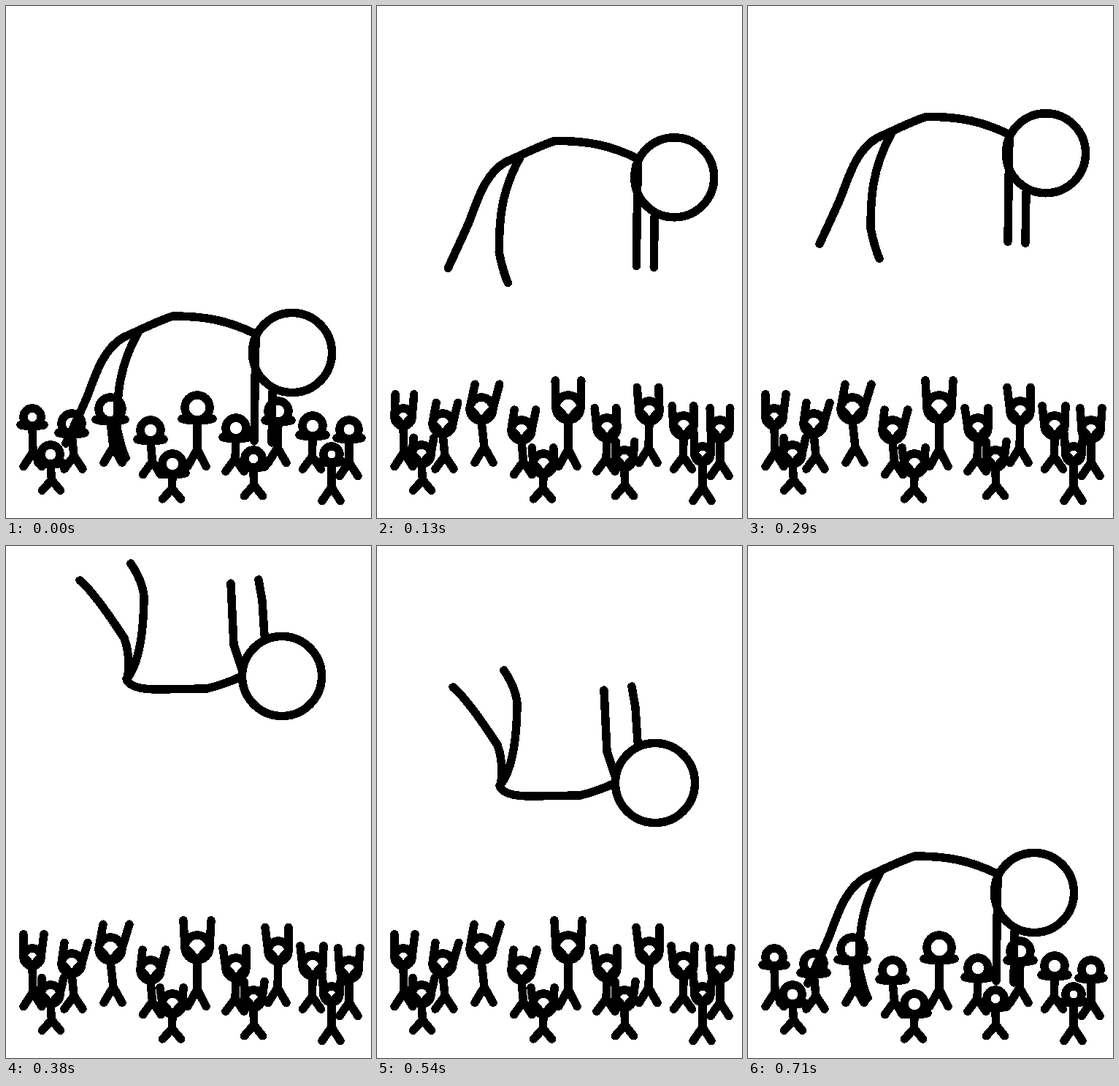
These frames come from a looping animation (500 by 700 pixels, 750 ms). An HTML page:

```html
<!DOCTYPE html>
<html lang="en">
<head>
<meta charset="utf-8">
<title>Crowd toss</title>
<style>
  html, body { margin: 0; width: 100%; height: 100%; overflow: hidden; background: #fff; }
  svg { display: block; width: 500px; height: 700px; }
  path, circle { fill: none; stroke: #000; stroke-width: 11.5; stroke-linecap: round; stroke-linejoin: round; }
  circle { fill: #fff; }
</style>
</head>
<body>
<svg viewBox="0 0 500 700" shape-rendering="crispEdges">
  <g id="crowd"></g>
  <g id="crawl">
    <path d="M355 243C320 226 290 219 243 219C225 224 200 237 175 248C145 265 135 305 124 332Q113 357 96 393"/>
    <path d="M194 243C168 290 166 330 166 372Q172 400 178 413"/>
    <path d="M379 322L378 392"/>
    <circle cx="406" cy="269" r="54.5"/>
    <path d="M356 245L354 390"/>
  </g>
  <g id="back">
    <path d="M101 47Q120 62 162 126Q171 150 166 184Q172 196 208 196L275 195Q300 189 323 178"/>
    <path d="M171 24Q188 50 189 70Q188 155 165 182"/>
    <path d="M308 51L312 135L323 168"/>
    <path d="M346 46L351 75L354 122"/>
    <circle cx="378" cy="178" r="54.5"/>
  </g>
</svg>
<script>
const LOOP = 750, STEPS = 18;

// head x, y, radius; head-to-hip length; lean
const people = [
  [36, 562, 12, 48, 2], [90, 571, 14, 44, 6], [143, 551, 16, 52, 8],
  [198, 580, 14, 43, 5], [262, 549, 17, 57, 0], [315, 577, 14, 42, -2],
  [373, 554, 14, 50, -2], [420, 574, 14, 42, -1], [470, 579, 13, 45, 0],
  [61, 613, 13, 35, 3], [228, 626, 14, 34, -1], [339, 619, 12, 36, 1],
  [446, 613, 11, 45, 0]
];

const $ = id => document.getElementById(id);
const mix = (a, b, t) => a + (b - a) * t;

function add(tag, attrs) {
  const el = document.createElementNS('http://www.w3.org/2000/svg', tag);
  for (const key in attrs) el.setAttribute(key, attrs[key]);
  $('crowd').append(el);
  return el;
}

const arms = people.map(([x, y, r, trunk, lean]) => {
  const hx = x + lean / 2, hy = y + trunk, fy = hy + trunk * 0.41;
  add('path', { d: `M${x} ${y + r}L${hx} ${hy}M${hx - 13} ${fy}L${hx} ${hy}L${hx + 12} ${fy}` });
  add('circle', { cx: x, cy: y, r });
  return add('path', {});
});

// lift raises the arms, spread opens them
function armPath([x, y, r, trunk, lean], lift, spread) {
  const side = s => ({
    hand: [x + s * mix(r + 4, r - 1 + 3 * spread, lift) + lean * lift, y + mix(r * 0.9, -trunk * 0.65, lift)],
    elbow: [x + s * mix(r * 0.8, r, lift), y + mix(r, -1, lift)]
  });
  const left = side(-1), right = side(1);
  return `M${left.hand}L${left.elbow}L${x} ${y + r + 1}L${right.elbow}L${right.hand}`;
}

// fast throw that slows towards the top
function rise(n) {
  const g = Math.exp(-0.684 * n);
  return [2 - 16 * g ** 1.5, 275 * g - 70];
}

// free fall from the top
const fall = n => [3 * Math.sin(n * Math.PI / 8), 7.1 * n * n + 8.1 * n];

let shown;
function draw(now) {
  // 24 steps a second, on a 10 ms clock
  const clock = Math.floor(now % LOOP / 10) * 10 + 4.9;
  const n = Math.floor(clock * STEPS / LOOP) % (STEPS - 1);
  if (n === shown) return;
  shown = n;

  const up = n < 8;
  const pose = up ? 'crawl' : 'back';
  $('crawl').style.display = up ? '' : 'none';
  $('back').style.display = up ? 'none' : '';
  $(pose).setAttribute('transform', `translate(${up ? rise(n) : fall(n - 9)})`);

  const lift = Math.min(1, n / 2), spread = Math.min(1, n / 5);
  arms.forEach((arm, i) => arm.setAttribute('d', armPath(people[i], lift, spread)));
}

const start = performance.now();
function tick() {
  draw(performance.now() - start);
  requestAnimationFrame(tick);
}
tick();
</script>
</body>
</html>
```
